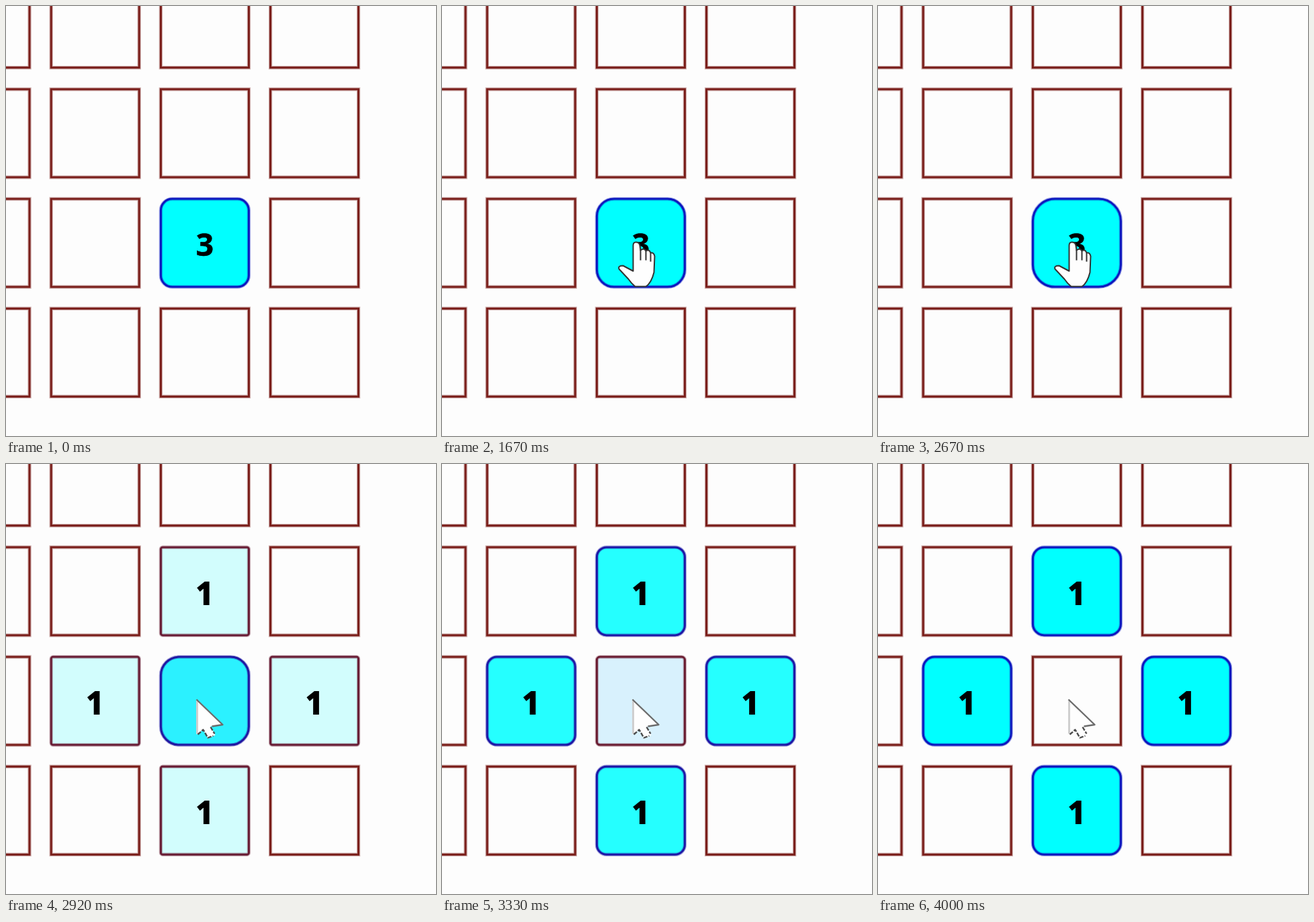
An HTML page for the animation above (4.16 s loop, 640 by 640 pixels).

```html
<!DOCTYPE html>
<html lang="en">
<head>
<meta charset="utf-8">
<title>Tile grid</title>
<style>
  html, body { margin: 0; width: 100%; height: 100%; overflow: hidden; background: #fdfdfd; }
  svg { display: block; width: 100vw; height: 100vh; }
  text { font: 700 46px "Open Sans", "Noto Sans", sans-serif; text-anchor: middle; fill: #000; stroke: #000; stroke-width: .6px; }
  text.one { stroke-width: 1.8px; }
</style>
</head>
<body>
<svg id="stage" viewBox="0 0 640 640">
  <g id="grid"></g>
  <g id="arrow" stroke-linejoin="round">
    <path d="M0 0V52L10 45L17 58L28 53L21 40L39 38Z" fill="#fefefe"/>
    <path d="M1 2V51" fill="none" stroke="#cfcfcf" stroke-width="3"/>
    <path d="M0 0L39 37.5L23 40" fill="none" stroke="#6c6c6c" stroke-width="2.4"/>
    <path d="M2 52L10 45L17 57L25 54M21 41L27 51" fill="none" stroke="#4c4c4c" stroke-width="2.4" stroke-dasharray="6 2"/>
  </g>
  <g id="hand" stroke="#333" stroke-width="2" stroke-linejoin="round">
    <path fill="#fefefe" d="M1 6Q1 1 5 1Q10 1 11 6L12 13Q17 9 20 14Q25 11 27 17Q32 16 33 22L32 46Q28 62 20 67H4Q-2 62 -6 56L-20 41Q-22 36 -14 36L1 44Z"/>
    <path fill="none" d="M12 12V28M20 14V28M27 17V30"/>
  </g>
</svg>
<script>
const NS = "http://www.w3.org/2000/svg";
const LOOP = 4160, STEP = 1000 / 12;
const PITCH = 163.2, SIZE = 131, LEFT = -96, TOP = -39.3;
const MOVE = 1000, HOVER = 1350, CLICK = 2750, LAG = 25;
const REST = 17, ROUND = 33;

const EMPTY = { fill: [253, 253, 253], line: [122, 30, 26] };
const FULL = { fill: [0, 255, 255], line: [14, 24, 190] };

const clamp = v => Math.min(1, Math.max(0, v));
const mix = (a, b, p) => a + (b - a) * p;
const rgb = c => `rgb(${c.map(Math.round)})`;
const blend = (key, p) => EMPTY[key].map((v, i) => mix(v, FULL[key][i], p));

// CSS "ease": cubic-bezier(.25, .1, .25, 1)
function ease(x) {
  if (x <= 0 || x >= 1) return clamp(x);
  const curve = (a, b, s) => 3 * a * s * (1 - s) ** 2 + 3 * b * s * s * (1 - s) + s ** 3;
  let lo = 0, hi = 1;
  for (let i = 0; i < 24; i++) {
    const mid = (lo + hi) / 2;
    if (curve(.25, .25, mid) < x) lo = mid; else hi = mid;
  }
  return curve(.1, 1, lo);
}

function set(el, attrs) {
  for (const k in attrs) el.setAttribute(k, attrs[k]);
  return el;
}

function add(tag, attrs) {
  return document.getElementById("grid").appendChild(set(document.createElementNS(NS, tag), attrs));
}

function makeCell(col, row) {
  const x = LEFT + col * PITCH, y = TOP + row * PITCH;
  const box = { x, y, width: SIZE, height: SIZE };
  const cell = {
    body: add("rect", { ...box, "stroke-width": 3 }),
    soft: add("rect", { ...box, fill: "none", "stroke-width": 5.4, opacity: .35 }),
    label: add("text", { x: x + SIZE / 2, y: y + 85 })
  };
  paint(cell, 0, 0, "");
  return cell;
}

function paint(cell, amount, radius, label, dim = 0) {
  const fill = blend("fill", amount);
  fill[1] -= dim;
  const outline = { rx: radius, stroke: rgb(blend("line", amount)) };
  set(cell.body, { ...outline, fill: rgb(fill) });
  set(cell.soft, outline);
  if (cell.label.textContent !== label) {
    cell.label.textContent = label;
    cell.label.setAttribute("class", label === "1" ? "one" : "");
  }
}

const cells = [];
for (let i = 0; i < 16; i++) cells.push(makeCell(i % 4, Math.floor(i / 4)));
const centre = cells[10];
const around = [cells[6], cells[9], cells[11], cells[14]];
const arrow = document.getElementById("arrow");
const hand = document.getElementById("hand");

function draw(time) {
  const t = Math.floor((time + 4) / STEP) * STEP;
  const spread = ease((t - CLICK - LAG) / 1000);
  const hover = ease((t - HOVER) / 1000);
  const clicked = t >= CLICK - 2;

  if (clicked) paint(centre, 1 - spread, ROUND * (1 - spread), "", 100 * spread * (1 - spread));
  else paint(centre, 1, mix(REST, ROUND, hover), "3");
  for (const cell of around) paint(cell, spread, REST * spread, clicked ? "1" : "");

  const go = clamp((t - MOVE) / 500);
  const at = `translate(${mix(472.5, 283.5, go)} ${mix(453, 350.5, go)})`;
  const pointing = t >= HOVER - 40 && !clicked;
  set(arrow, { transform: at, visibility: t >= MOVE - 2 && !pointing ? "visible" : "hidden" });
  set(hand, { transform: at, visibility: pointing ? "visible" : "hidden" });
}

const start = performance.now();
function tick() {
  draw((performance.now() - start) % LOOP);
  requestAnimationFrame(tick);
}
tick();
</script>
</body>
</html>
```
